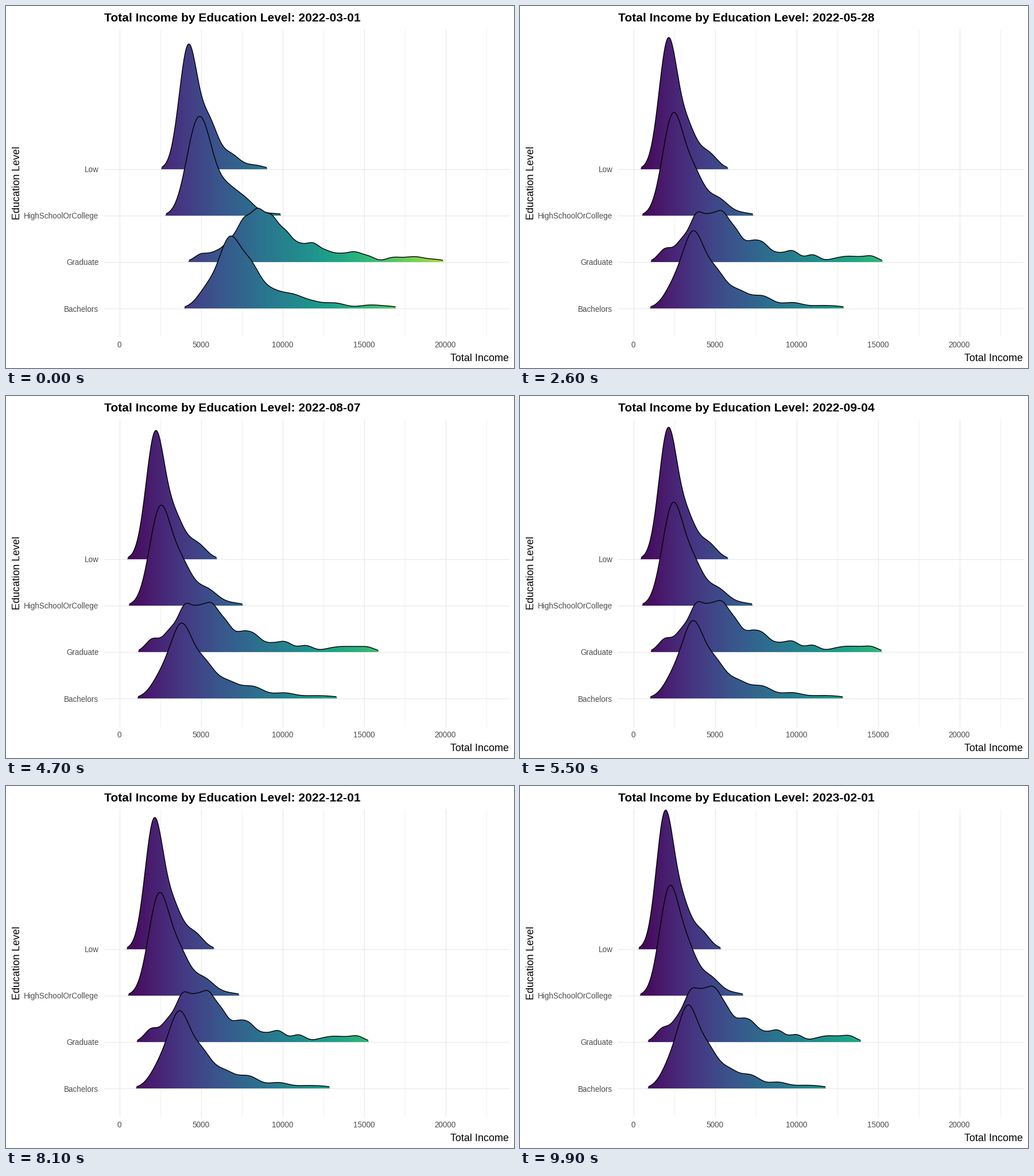
Write a matplotlib script that moves like this. It is 885 px wide and 632 px high and loops after 10 s.

```python
import numpy as np
import matplotlib.pyplot as plt
from matplotlib.animation import FuncAnimation
from matplotlib.path import Path

W, H, DPI = 885, 632, 100
FRAMES, STEP = 100, 9          # STEP frames lead from one month to the next
CUTOFF = 2.43                  # ridges lower than this are not drawn
LEFT, RIGHT = 202, 842         # span of the density grid
ZERO = 197                     # position of zero income
BANDWIDTH = 11
PT = 72 / DPI

plt.rcParams["font.family"] = "Liberation Sans"

# Monthly income follows the working days, April to February
DAYS = [21, 22, 22, 21, 23, 22, 21, 22, 22, 22, 20]

# label, baseline, kernel width, then the income clusters (position, height)
# in March and in a month with 22 working days
RIDGES = [
    ("Low", 284, 15.8,
     [(317, 212), (353, 78), (391, 24), (432, 6.5)],
     [(257.5, 222), (291, 67), (327, 27)]),
    ("HighSchoolOrCollege", 365, 18,
     [(327, 105), (347, 95), (383, 41), (415, 25), (466, 3)],
     [(265.5, 170), (302, 68), (344, 28), (387, 4)]),
    ("Graduate", 446, 12,
     [(340, 13), (366, 14.5), (390, 30), (414, 63), (438, 76), (462, 66),
      (486, 44), (510, 24), (534, 28), (558, 15), (582, 11), (606, 15),
      (630, 9), (672, 6.5), (692, 4.5), (712, 7), (732, 3.5), (752, 3)],
     [(253, 22), (282, 33), (307, 72), (330, 60), (352, 70), (375, 46),
      (402, 28), (423, 27), (449, 12), (474, 18), (509, 12), (548, 4.5),
      (568, 7), (588, 6), (611, 9.5)]),
    ("Bachelors", 527, 18,
     [(352, 34), (389, 112), (425, 68), (463, 25), (498, 20), (532, 10),
      (573, 8.5), (632, 5), (666, 2.9)],
     [(269, 37), (302, 122), (340, 58), (380, 27), (422, 20), (474, 9.5),
      (520, 3.5), (550, 3)]),
]

grid = np.linspace(LEFT, RIGHT, 512)


def density(clusters, width, days=22):
    """Sum of Gaussian kernels; pay scales with the days, the bandwidth does not."""
    x, h = np.array(clusters).T[..., None]
    s = days / 22
    sigma = np.sqrt(BANDWIDTH ** 2 + s ** 2 * (width ** 2 - BANDWIDTH ** 2))
    mid = ZERO + (x - ZERO) * s
    return (h * width / sigma * np.exp(-.5 * ((grid - mid) / sigma) ** 2)).sum(0)


fig = plt.figure(figsize=(W / DPI, H / DPI), dpi=DPI, facecolor="white")
ax = fig.add_axes([0, 0, 1, 1])
ax.axis("off")


def label(x, y, s, px, color="black", **kw):
    return ax.text(x, y, s, fontsize=px * PT, color=color, va="baseline", **kw)


def rule(x, y, px=1.4):
    ax.plot(x, y, color="#EBEBEB", lw=px * PT, zorder=0)


# Panel grid and axis text
for n in range(5):
    x = ZERO + 142 * n
    rule([x + 71, x + 71], [40, 576], .7)
    rule([x, x], [40, 576])
    label(x, 595, str(5000 * n), 13.5, "#4D4D4D", ha="center")
label(875, 619.5, "Total Income", 18, ha="right")
label(24, 308, "Education Level", 18, ha="center", rotation=90,
      rotation_mode="anchor")
title = label(170.5, 26.5, "", 21.07, weight="bold")

shades = plt.get_cmap("viridis")(np.linspace(0, 1, 512))[None]
ridges = []
for z, (name, base, width, march, usual) in enumerate(RIDGES):
    rule([170, 875], [base, base])
    label(161, base + 6, name, 13.5, "#4D4D4D", ha="right")
    fill = ax.imshow(shades, extent=(LEFT, RIGHT, base + .5, base - 250),
                     aspect="auto", interpolation="nearest", zorder=2 + 2 * z)
    line, = ax.plot([], [], color="black", lw=1.4 * PT, zorder=3 + 2 * z,
                    solid_joinstyle="round", solid_capstyle="butt")
    months = [density(march, width)] + [density(usual, width, d) for d in DAYS]
    ridges.append((base, months, fill, line))

# Whole numbers fall on pixel centres
ax.set_xlim(-.5, W - .5)
ax.set_ylim(H - .5, -.5)


def update(i):
    k = min(i // STEP, len(DAYS) - 1)
    t = i / STEP - k
    day = np.datetime64("2022-03-01") + 337 * i // (FRAMES - 1)
    title.set_text(f"Total Income by Education Level: {day}")
    for base, months, fill, line in ridges:
        h = (1 - t) * months[k] + t * months[k + 1]
        shown = h >= CUTOFF
        floor = base + .5
        line.set_data(grid, np.where(shown, base - h, np.nan))
        top = np.column_stack([grid, np.where(shown, base - h, floor)])
        area = np.vstack([[LEFT, floor], top, [RIGHT, floor], [LEFT, floor]])
        fill.set_clip_path(Path(area), ax.transData)


anim = FuncAnimation(fig, update, frames=FRAMES, init_func=lambda: update(0),
                     interval=100, repeat=True, repeat_delay=0)
plt.show()
```
